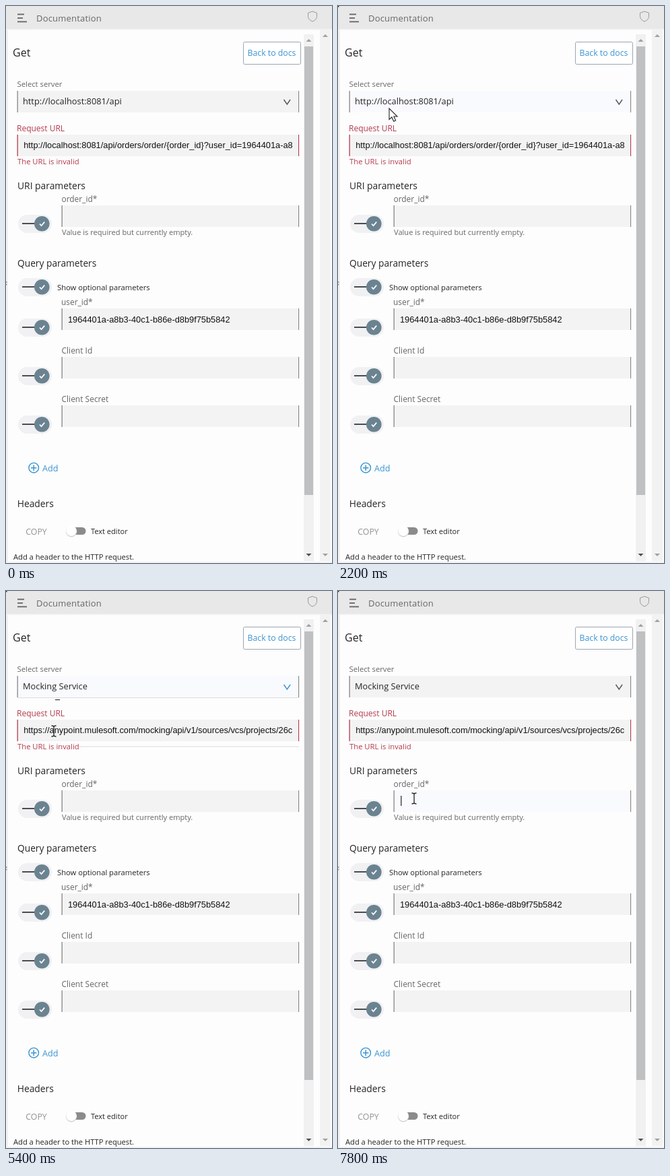
An HTML page for the animation above (8000 ms loop, 484x827 px).

```html
<!DOCTYPE html>
<html lang="en">
<head>
<meta charset="utf-8">
<title>Request form</title>
<style>
  html, body { margin: 0; width: 100%; height: 100%; overflow: hidden; background: #fdfdfd; }
  svg { display: block; width: 100%; height: 100%; font-family: "Open Sans", sans-serif; }
  .input { font-family: "Liberation Sans", Arial, sans-serif; }
</style>
</head>
<body>
<svg id="stage" viewBox="0 0 484 827"></svg>
<script>
const LOOP = 8000, STEP = 200;
const OPEN = 2400, PICK = 5200, SETTLED = 5600, FOCUS = 6800;
const INK = '#252525', GREY = '#666', BLUE = '#3a94d2', RED = '#b33a4c';
const FIELD = '#f3f3f4', ACTIVE = '#f9fafd', EDGE = '#858585';
const LOCAL = 'http://localhost:8081/api', MOCK = 'Mocking Service';
const LOCAL_URL = LOCAL + '/orders/order/{order_id}?user_id=1964401a-a8';
const MOCK_URL = 'https://anypoint.mulesoft.com/mocking/api/v1/sources/vcs/projects/26c';

const rect = (x, y, w, h, fill, more = '') =>
  `<rect x="${x}" y="${y}" width="${w}" height="${h}" fill="${fill}" ${more}/>`;
const path = (d, stroke, width = 1, more = 'fill="none"') =>
  `<path d="${d}" stroke="${stroke}" stroke-width="${width}" ${more}/>`;
const text = (x, y, size, str, fill = INK, more = '') =>
  `<text x="${x}" y="${y}" font-size="${size}" fill="${fill}" ${more}>${str}</text>`;
const group = (id, body, more = '') => `<g id="${id}" ${more}>${body}</g>`;

const field = (x, y, h, edge = EDGE, id = '') =>
  rect(x, y, 435 - x, h, FIELD, id && `id="${id}"`) +
  rect(x - .5, y, 1.3, h, edge) + rect(434, y, 1.1, h, edge);

const toggle = y =>
  rect(18, y - 13, 50, 27, '#f1f1f3', 'rx="13.5"') +
  rect(24, y - 1, 20, 2, '#484d50') +
  `<circle cx="53.3" cy="${y + .3}" r="11.3" fill="#6b8391"/>` +
  path(`M50 ${y + .5}l2.5 2.7 4.7 -5.6`, '#fff', 1.7);

const arrowHead = (x, y, dir, fill) =>
  `<path d="M${x - 4} ${y + 2 * dir}h8l-4 ${-4 * dir}z" fill="${fill}"/>`;

function header() {
  return rect(0, 0, 484, 34, '#e8e8e9') + rect(0, 34, 484, 1.5, '#f2f2f2') +
    path('M17 12.3h10M17 17.8h8M17 23.3h14', '#626262', 1.7) +
    text(45, 23, 13, 'Documentation', '#666', 'letter-spacing=".2"') +
    path('M455 8l6.5 2.3v5q0 5 -6.5 7.7q-6.5 -2.7 -6.5 -7.7v-5z', '#9a9a9a');
}

function scrollbars() {
  return rect(442, 42, 15, 782, '#f1f1f2') + rect(443, 60, 13, 666, '#bfc0c2') +
    arrowHead(449.5, 51, 1, '#a0a0a0') + arrowHead(449.5, 815, -1, '#505050') +
    rect(466, 35, 16, 789, '#f2f2f3') +
    arrowHead(474, 44, 1, '#a0a0a0') + arrowHead(474, 815, -1, '#a0a0a0');
}

function form() {
  return text(10, 75, 16, 'Get') +
    rect(352.5, 53.5, 85, 33, '#fff', 'rx="2" stroke="#9ba6b0"') +
    text(358.5, 74, 12.3, 'Back to docs', BLUE) +
    text(16.5, 120, 11.3, 'Select server', GREY) +
    field(17, 126, 32, EDGE, 'selectBg') +
    text(25, 146, 12.8, LOCAL, INK, 'id="server"') +
    path('M412.5 139l4.8 7 4.8 -7', '#555', 1.4, 'fill="none" id="chevron"') +
    text(16, 186, 12, 'Request URL', RED) +
    field(17, 191, 32, RED) +
    text(26.2, 211, 12.8, LOCAL_URL, '#111', 'class="input" id="url" clip-path="url(#urlClip)"') +
    text(17, 235, 11.25, 'The URL is invalid', RED) +
    text(17, 271.5, 13.85, 'URI parameters') +
    text(82.5, 291, 11.9, 'order_id*', GREY) +
    field(83, 296, 32, EDGE, 'orderBg') +
    text(83, 340, 11.1, 'Value is required but currently empty.', GREY) +
    text(17, 386.5, 13.75, 'Query parameters') +
    text(76, 422, 11.2, 'Show optional parameters') +
    text(82, 444, 11.9, 'user_id*', GREY) +
    field(83, 449, 32) +
    text(92, 470, 12.8, '1964401a-a8b3-40c1-b86e-d8b9f75b5842', '#111', 'class="input"') +
    text(82.5, 515.5, 12, 'Client Id', GREY) + field(83, 521, 32) +
    text(82.5, 587.5, 12, 'Client Secret', GREY) + field(83, 593, 32) +
    [323, 417, 477, 549, 621].map(toggle).join('') +
    `<circle cx="41.2" cy="685.7" r="7.3" fill="none" stroke="${BLUE}" stroke-width="1.4"/>` +
    path('M37 685.7h8.4M41.2 681.5v8.4', BLUE, 1.5) +
    text(54, 691, 12.6, 'Add', BLUE) +
    text(16.7, 743.5, 13.85, 'Headers') +
    text(29.3, 784.5, 12.3, 'COPY', '#929292') +
    rect(92, 774, 26.5, 11, '#8b8b8b', 'rx="5.5"') +
    '<circle cx="97" cy="780.2" r="8.2" fill="#d0d0d0"/><circle cx="97" cy="779.2" r="7.8" fill="#fff"/>' +
    text(126, 784, 11.05, 'Text editor') +
    text(11, 822, 11.15, 'Add a header to the HTTP request.');
}

const menu = () =>
  rect(16, 158, 420, 73, '#fefefe') +
  rect(17, 190, 418, 40, '#f3f3f4', 'id="row"') +
  path('M17 158.5H435M17 231H435', '#d5d8da') +
  path('M17.5 159v31M434.5 159v31', '#cfd2d4') +
  text(26.5, 180, 12.85, LOCAL, BLUE, 'font-weight="700"') +
  text(26, 215, 12.95, MOCK);

const closing = () => path('M108 231H435M17 158.5H435', '#dcdcde') + path('M73 161.5h7', '#333', 1.2);

const pointer = () =>
  path('M0 0V16.5L3.9 13L6.7 19.3L9.6 18L6.9 12H12z', '#222', 1.1, 'fill="#fff"');
const hand = () =>
  path('M-2 1q0 -2 2 -2t2 2v6q3 -1 3.6 .8q3 -.9 3.4 .9q2.6 -.6 2.6 2v5q0 3 -2 6.3h-8.6q-1.8 -4 -5.4 -8.4q-1.2 -2.2 .4 -2.8q1.4 -.4 2 1.2z',
    '#222', 1.2, 'fill="#fff"') + path('M2 7v4M5.6 8v4M9 9v3.5', '#222');
const beam = () => path('M-3.5 -8q3 0 3.5 1.5q.5 -1.5 3.5 -1.5M0 -6.5v13M-3.5 8q3 0 3.5 -1.5q.5 1.5 3.5 1.5', '#222', 1.3);

const stage = document.getElementById('stage');
stage.innerHTML =
  '<clipPath id="urlClip"><rect x="20" y="190" width="405" height="34"/></clipPath>' +
  rect(0, 0, 484, 827, '#fdfdfd') + rect(0, 35, 3, 792, '#f1f1f2') +
  header() + scrollbars() + form() + rect(0, 825, 484, 2, '#f3f3f4') +
  path('M.7 409v2M.7 412.5v2', '#999', 1.4) +
  rect(0, 0, 1.5, 1.5, '#222', 'id="corner"') +
  group('menu', menu()) + group('closing', closing()) +
  rect(93.2, 304, 1.2, 15, '#222', 'id="caret"') +
  group('cursor', group('pointer', pointer()) + group('hand', hand()) + group('beam', beam()));

const el = {};
stage.querySelectorAll('[id]').forEach(n => el[n.id] = n);
const show = (name, on) => el[name].setAttribute('display', on ? 'inline' : 'none');

// time, x, y of the cursor's hot spot
const track = [
  [1400, 8, 170], [1800, 76, 152], [2600, 76, 152], [3000, 76, 167],
  [3600, 71, 208], [5400, 71, 208], [6000, 98, 275], [6400, 113, 308], [LOOP, 113, 308]
];

function cursorAt(t) {
  const i = Math.max(1, track.findIndex(k => k[0] > t));
  const [t0, x0, y0] = track[i - 1], [t1, x1, y1] = track[i];
  const p = Math.max(0, (t - t0) / (t1 - t0)), e = p * p * (3 - 2 * p);
  return [x0 + (x1 - x0) * e, y0 + (y1 - y0) * e];
}

function draw(ms) {
  const t = Math.floor((ms % LOOP) / STEP) * STEP;
  const [x, y] = cursorAt(t);
  const open = t >= OPEN && t < PICK, picked = t >= PICK, focused = t >= FOCUS;
  const onRow = open && y > 190;

  el.cursor.setAttribute('transform', `translate(${x} ${y})`);
  show('cursor', t >= track[0][0]);
  show('pointer', !picked && !onRow);
  show('hand', onRow);
  show('beam', picked);

  show('menu', open);
  show('row', onRow);
  show('closing', picked && t < SETTLED);
  show('corner', t >= 2000);
  show('caret', focused && (t - FOCUS) % 1000 < 500);

  el.server.textContent = picked ? MOCK : LOCAL;
  el.url.textContent = picked ? MOCK_URL : LOCAL_URL;
  el.selectBg.setAttribute('fill', t >= 1800 && !focused ? ACTIVE : FIELD);
  el.orderBg.setAttribute('fill', focused ? ACTIVE : FIELD);
  el.chevron.setAttribute('stroke', t >= OPEN && !focused ? BLUE : '#555');
  el.chevron.setAttribute('transform', open ? 'rotate(180 417.3 142.5)' : '');
}

const start = performance.now();
function tick() {
  draw(performance.now() - start);
  requestAnimationFrame(tick);
}
tick();
</script>
</body>
</html>
```
